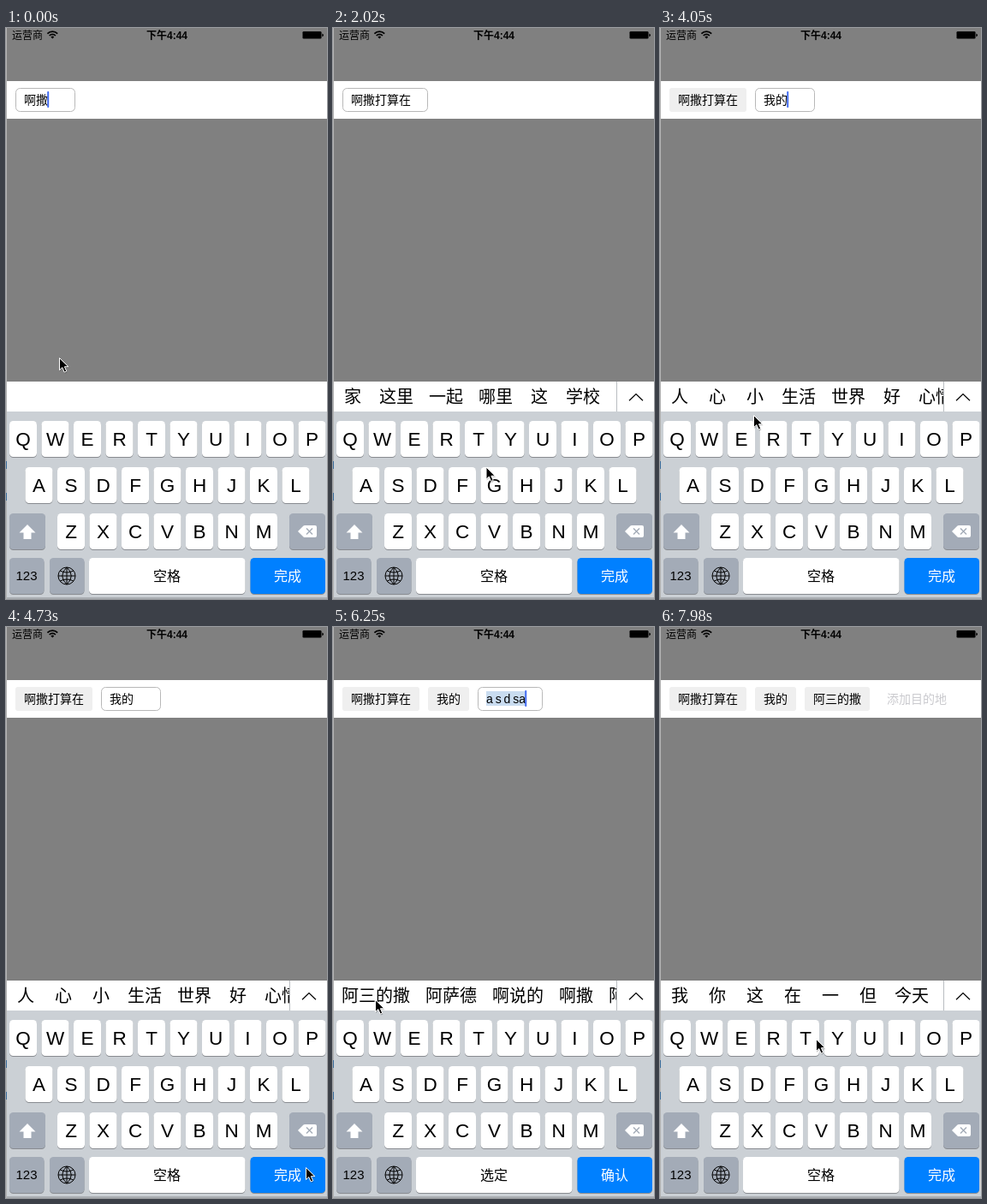
Recreate the animation shown at these times as an HTML page. Size 375x667 px, loop 8000 ms.

```html
<!DOCTYPE html>
<html lang="zh-CN">
<head>
<meta charset="utf-8">
<title>Tag input</title>
<style>
html, body { margin: 0; width: 100%; height: 100%; overflow: hidden; background: #808080; }
svg { display: block; width: 100vw; height: 100vh; }
text { font-family: "Liberation Sans", "Noto Sans CJK SC", "Noto Sans CJK", sans-serif; }
.field text { font-size: 14px; word-spacing: -1px; }
.cand { font-size: 20px; font-weight: 300; }
.key { font-size: 22.5px; text-anchor: middle; }
.label { font-size: 16px; font-weight: 300; text-anchor: middle; }
</style>
</head>
<body>
<svg id="stage" viewBox="0 0 375 667">
  <defs>
    <clipPath id="barClip"><rect x="1" y="413" width="330.5" height="35"/></clipPath>
  </defs>
  <rect width="375" height="667" fill="#808080"/>
  <g id="status">
    <text x="7" y="12.7" font-size="12">运营商</text>
    <g fill="none" stroke="#000" stroke-width="1.7">
      <path d="M48.4 6.6a8.2 8.2 0 0 1 11.8 0M50.7 9a5 5 0 0 1 7.2 0"/>
      <path d="M52.4 10.4a2.7 2.7 0 0 1 3.8 0L54.3 12.6z" fill="#000" stroke="none"/>
    </g>
    <text x="188" y="12.7" font-size="12" font-weight="700" text-anchor="middle">下午4:44</text>
    <rect x="346.5" y="4" width="22" height="8.5" rx="1.3"/>
    <path d="M369.3 6.4q1.7 .4 1.7 1.9t-1.7 1.9z"/>
  </g>
  <rect y="62" width="375" height="44" fill="#fff"/>
  <g class="field">
    <g id="tags"></g>
    <rect id="box" y="70.5" height="27" rx="5" fill="#fff" stroke="#b8b8b8"/>
    <rect id="mark" y="75" height="17" fill="#c9dcf0"/>
    <text id="hint" y="89.2" fill="#cacace">添加目的地</text>
    <text id="done" y="89.2"></text>
    <text id="typed" y="89.2"></text>
    <rect id="caret" y="74" width="2" height="19" rx=".8" fill="#426bf2"/>
  </g>
  <rect y="413" width="375" height="35" fill="#fff"/>
  <g id="bar">
    <g id="cands" clip-path="url(#barClip)"></g>
    <path d="M331.5 413V448" stroke="#b9bdc1"/>
    <path d="M346 435.3L354 427.6L362 435.3" fill="none" stroke="#000" stroke-width="1.2"/>
  </g>
  <g id="board"><rect y="448" width="375" height="219" fill="#cbd0d5"/></g>
  <rect y="665" width="375" height="2" fill="#a9adb1"/>
  <rect width="1" height="667" fill="#b4b4b4"/>
  <path d="M.5 506V515M.5 543V552" stroke="#3d6f9e"/>
  <g id="mouse">
    <path d="M1 2V16L4.3 13L6.8 18.6L9.4 17.5L7 12.2H11.6z" fill="#000" opacity=".22"/>
    <path d="M.5 .5V14.6L3.8 11.6L6.2 17L8.7 15.9L6.4 10.7H10.9z" fill="#000" stroke="#fff" stroke-linejoin="round"/>
  </g>
</svg>
<script>
const LOOP = 8000;
const TAGS = ['啊撒打算在', '我的', '阿三的撒'];
const HOME = '我 你 这 在 一 但 今天';

// [ms, tag count, committed text, marked text, candidates]
const STEPS = [
  [0, 0, '啊撒', '', ''],
  [70, 0, '啊撒', 'd', '的 到 都 对 多 等 点 大'],
  [170, 0, '啊撒', 'da', '大 打 达 答 搭 大家 哒'],
  [300, 0, '啊撒', 'da s', '打算 大神 大师 大叔 打死 大'],
  [790, 0, '啊撒打算', '', ''],
  [850, 0, '啊撒打算', '', '去 在 把 买 给 再 做 怎么'],
  [1290, 0, '啊撒打算在', '', ''],
  [1430, 0, '啊撒打算在', '', '家 这里 一起 哪里 这 学校 你'],
  [2500, 1, '', '', ''],
  [2640, 1, '', '', HOME],
  [3520, 1, '我', '', ''],
  [3650, 1, '我', '', '的 也 是 在 就 要 想 不'],
  [3930, 1, '我的', '', ''],
  [4020, 1, '我的', '', '人 心 小 生活 世界 好 心情'],
  [4820, 2, '', '', ''],
  [4950, 2, '', '', HOME],
  [5580, 2, '', 'a', '啊 阿 爱 按 安 哎 吖 暗'],
  [5680, 2, '', 'a s', '啊撒 暗示 按时 爱上 安 啊'],
  [5790, 2, '', 'a s d', '阿萨德 啊说的 爱上的 啊 阿'],
  [5890, 2, '', 'a s d s', '阿三的撒 阿萨德 啊说的 啊撒 阿三'],
  [5990, 2, '', 'a s d sa', '阿三的撒 阿萨德 啊说的 啊撒 阿三'],
  [6390, 2, '阿三的撒', '', ''],
  [7320, 3, '', '', ''],
  [7450, 3, '', '', HOME]
];

// [ms, x, y] of the pointer tip
const PATH = [
  [0, 62, 385], [380, 62, 385], [700, 39, 428], [870, 39, 428], [1080, 66, 431],
  [1820, 66, 431], [2350, 364, 647], [2640, 361, 645], [2920, 173, 465],
  [3400, 24, 431], [3930, 24, 431], [4050, 109, 452], [4730, 350, 631],
  [4780, 361, 645], [4880, 361, 645], [5260, 118, 436], [5530, 62, 436],
  [6050, 62, 436], [6240, 49, 435], [6480, 49, 435], [7100, 361, 646],
  [7380, 361, 645], [7980, 182, 481], [8000, 182, 481]
];

const $ = id => document.getElementById(id);
const set = (el, attrs) => { for (const k in attrs) el.setAttribute(k, attrs[k]); return el; };
function add(parent, tag, attrs, text) {
  const el = set(document.createElementNS('http://www.w3.org/2000/svg', tag), attrs);
  if (text) el.textContent = text;
  return parent.appendChild(el);
}
const show = (el, on) => { el.style.display = on ? '' : 'none'; };

const board = $('board');
function key(x, y, width, fill) {
  const size = { x, width, height: 42, rx: 4.5 };
  add(board, 'rect', { ...size, y: y + 1, fill: '#888b90' });
  add(board, 'rect', { ...size, y, fill });
}
function label(x, text, fill = '#000') {
  return add(board, 'text', { class: 'label', x, y: 646, fill }, text);
}

[['QWERTYUIOP', 4, 459], ['ASDFGHJKL', 22.5, 513], ['ZXCVBNM', 60, 567]].forEach(([row, x0, y]) => {
  [...row].forEach((ch, i) => {
    const x = x0 + i * 37.5;
    key(x, y, 32, '#fff');
    add(board, 'text', { class: 'key', x: x + 16, y: y + 29.3 }, ch);
  });
});
const GREY = '#a3abb7';
key(4, 567, 42, GREY);
key(331, 567, 42, GREY);
key(4, 619, 40.5, GREY);
key(51, 619, 40.5, GREY);
key(97, 619, 182.5, '#fff');
key(285.5, 619, 87.5, '#0080ff');
add(board, 'path', { d: 'M25 580L34.5 589.5H29.5V597H20.5V589.5H15.5z', fill: '#fff' });
add(board, 'path', { d: 'M341 588L347.5 581.5Q348.3 581 349 581H361Q363 581 363 583V593Q363 595 361 595H349Q348.3 595 347.5 594.5z', fill: '#fff' });
add(board, 'path', { d: 'M351 584.5L358 591.5M358 584.5L351 591.5', stroke: GREY, 'stroke-width': 1.4 });
add(board, 'text', { x: 24, y: 645.3, 'font-size': 15, 'text-anchor': 'middle' }, '123');
add(board, 'path', {
  d: 'M61 640a10 10 0 1 0 20 0a10 10 0 1 0-20 0zH81M71 630V650M71 630q-10.5 10 0 20q10.5-10 0-20M63.2 634q7.8 4 15.6 0M63.2 646q7.8-4 15.6 0',
  fill: 'none', stroke: '#000', 'stroke-width': 1
});
const space = label(188, '空格');
const enter = label(329, '完成', '#fff');

const done = $('done'), typed = $('typed'), caret = $('caret');
const widthOf = el => el.textContent ? el.getComputedTextLength() : 0;

function drawTags(count) {
  const box = $('tags');
  box.textContent = '';
  let x = 11;
  for (const tag of TAGS.slice(0, count)) {
    const width = tag.length * 14 + 20;
    add(box, 'rect', { x, y: 70, width, height: 28, rx: 3, fill: '#efefef' });
    add(box, 'text', { x: x + 10, y: 89.2 }, tag);
    x += width + 10;
  }
  return x;
}

function drawCands(list) {
  const box = $('cands');
  box.textContent = '';
  show($('bar'), list);
  let x = 1;
  for (const word of list ? list.split(' ') : []) {
    const w = word.length * 20, cell = Math.max(44, w + 18);
    add(box, 'text', { class: 'cand', x: x + (cell - w) / 2, y: 438.4 }, word);
    x += cell;
  }
}

function drawStep([, count, text, marked, list]) {
  const left = drawTags(count), x = left + 10;
  done.textContent = text;
  typed.textContent = marked;
  const w1 = widthOf(done), w2 = widthOf(typed);
  set(done, { x });
  set(typed, { x: x + w1 });
  set($('mark'), { x: x + w1, width: w2 });
  set($('box'), { x: left + .5, width: Math.max(70, w1 + w2 + 30) - 1 });
  set($('hint'), { x });
  set(caret, { x: x + Math.max(0, w1 + w2 - .8) });
  show($('box'), text || marked);
  show($('hint'), !text && !marked);
  drawCands(list);
  space.textContent = marked ? '选定' : '空格';
  enter.textContent = marked ? '确认' : '完成';
}

// Time of the last edit at each step; the caret stays lit for a while after it
const edits = [];
STEPS.forEach((s, i) => {
  const p = STEPS[i - 1];
  edits[i] = p && p[2] + p[3] === s[2] + s[3] ? edits[i - 1] : s[0];
});

function pointer(t) {
  let i = 1;
  while (i < PATH.length - 1 && PATH[i][0] <= t) i++;
  const [t0, x0, y0] = PATH[i - 1], [t1, x1, y1] = PATH[i];
  const k = (t - t0) / (t1 - t0);
  return [x0 + (x1 - x0) * k, y0 + (y1 - y0) * k];
}

let current = -1, start = null;
function frame(now) {
  if (start === null) start = now;
  const t = (now - start) % LOOP;
  let i = STEPS.length - 1;
  while (STEPS[i][0] > t) i--;
  if (i !== current) drawStep(STEPS[current = i]);
  show(caret, (t - edits[i]) % 860 < 530);
  const [x, y] = pointer(t);
  set($('mouse'), { transform: `translate(${x.toFixed(1)} ${y.toFixed(1)})` });
  requestAnimationFrame(frame);
}
requestAnimationFrame(frame);
</script>
</body>
</html>
```
